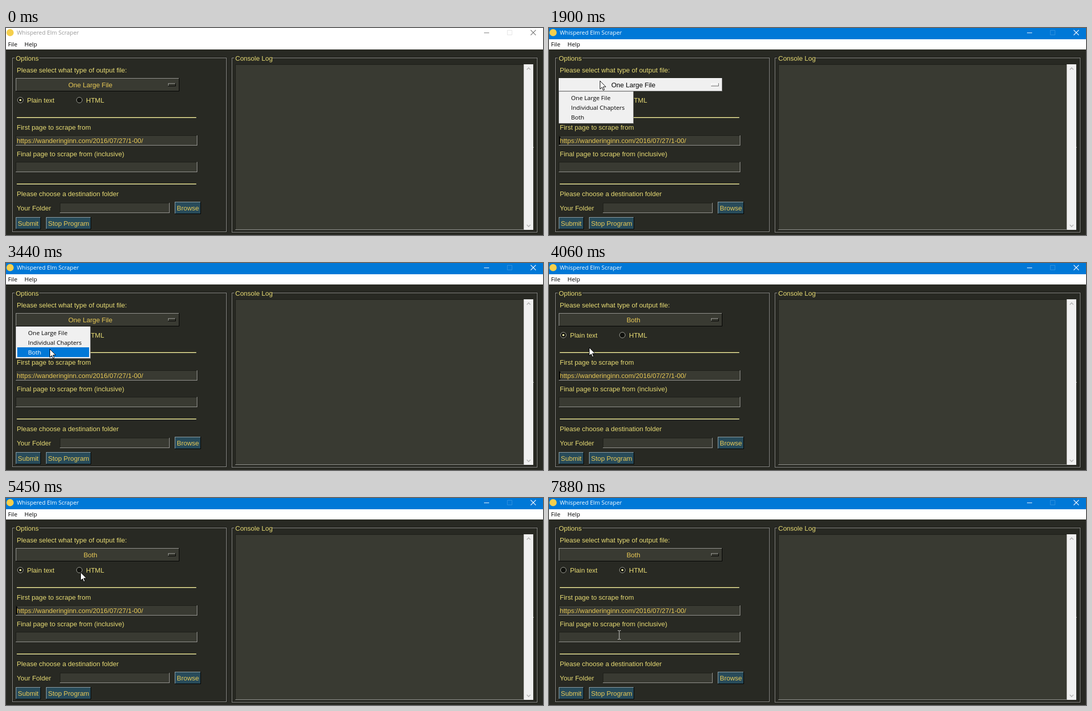
Animation, 1047 px wide and 405 px high, one loop 8000 ms. Source, as an HTML page:

```html
<!DOCTYPE html>
<html lang="en">
<head>
<meta charset="utf-8">
<title>Scraper window</title>
<style>
html, body { margin: 0; width: 100%; height: 100%; overflow: hidden; background: #282923; }
svg { display: block; --bar: #fff; --caption: #999; --control: #777; --disabled: #e3e3e3; }
svg.active { --bar: #0078d7; --caption: #fff; --control: #fff; --disabled: #3393df; }
text { font: 13px "Liberation Sans", Arial, sans-serif; fill: #e7db74; white-space: pre; }
.ui { font: 11.4px "Open Sans", "Noto Sans", sans-serif; fill: #000; }
.caption { font-size: 11.2px; fill: var(--caption); }
.item { font-size: 11.6px; }
.amber { fill: #e7c855; }
.black { fill: #000; }
rect, .edge { shape-rendering: crispEdges; }
</style>
</head>
<body>
<svg id="stage" width="1047" height="405"></svg>
<script>
const LOOP = 8000;
const MENU_OPEN = 1820, MENU_CLOSE = 3970;
const ACTIVATE = 1730, PRESS = 5910, RELEASE = 6000;
const ITEMS = ['One Large File', 'Individual Chapters', 'Both'];

// Pointer path: time, x, y
const PATH = [
  [120, 927, 398], [890, 349, 143], [1270, 146, 101], [1730, 99, 101], [1900, 99, 103],
  [2210, 99, 103], [2670, 92, 131], [2830, 92, 131], [3050, 90, 155], [3210, 90, 155],
  [3440, 85, 168], [3750, 85, 166], [3820, 75, 166], [3900, 75, 166], [4210, 80, 164],
  [4370, 80, 164], [4840, 107, 158], [5220, 140, 149], [5450, 145, 145],
  [6610, 145, 145], [6690, 146, 154], [7240, 147, 217], [7570, 147, 217], [7880, 137, 268]
];

const rect = (x, y, w, h, fill, extra = '') =>
  `<rect x="${x}" y="${y}" width="${w}" height="${h}" fill="${fill}" ${extra}/>`;
const text = (x, y, s, cls = '', extra = '') =>
  `<text x="${x}" y="${y}" class="${cls}" ${extra}>${s}</text>`;
const line = (d, stroke, extra = '') => `<path d="${d}" fill="none" stroke="${stroke}" ${extra}/>`;
const group = (id, body) => `<g id="${id}">${body}</g>`;

function bevel(x, y, w, h, fill, topLeft, bottomRight) {
  return rect(x, y, w, h, bottomRight) + rect(x, y, w - 1, h - 1, topLeft) +
    rect(x + 1, y + 1, w - 2, h - 2, fill);
}
const field = (x, y, w, h) => bevel(x, y, w, h, '#393a32', '#1c1d18', '#9c9c98');
const button = (x, y, w, label) =>
  bevel(x, y, w, 24, '#284b5a', '#93a5ac', '#000') + text(x + 4, y + 17, label, 'amber');
const outline = (x, y, w, h, color) =>
  line(`M${x + .5} ${y + .5}h${w - 1}v${h - 1}h${1 - w}z`, color, 'class="edge"');
const groove = (x, y, w, h, label, labelWidth) =>
  outline(x - 1, y - 1, w, h, '#181915') + outline(x, y, w, h, '#949491') +
  rect(x + 5, y - 5, labelWidth, 11, '#282923') + text(x + 7, y + 6, label);
const separator = y => rect(21, y, 350, 1, '#8b8346') + rect(21, y + 1, 350, 1, '#ffffb9');
const optionMenu = (fill, light, dark, cls) =>
  bevel(19, 98, 319, 26, fill, light, dark) + bevel(316, 108, 15, 6, fill, light, dark) +
  text(164.5, 116, ITEMS[0], cls + ' choice', 'text-anchor="middle"');
const radio = (x, dotId) =>
  `<circle cx="${x}" cy="141" r="5.5" fill="#11120e" stroke="#a5a59c"/>` +
  `<circle id="${dotId}" cx="${x}" cy="141" r="2.1" fill="#f0e9a8"/>`;

const titleBar =
  rect(0, 0, 1047, 22, 'var(--bar)') + rect(0, 22, 1047, 20, '#fff') +
  '<circle cx="8" cy="9" r="7" fill="#f5cf4c"/>' +
  text(21, 13, 'Whispered Elm Scraper', 'ui caption') +
  text(4, 36, 'File', 'ui') + text(36, 36, 'Help', 'ui') +
  line('M932 9.5h10', 'var(--control)') + line('M977.5 4.5h9v9h-9z', 'var(--disabled)') +
  line('M1023 4l10 10m0-10l-10 10', 'var(--control)', 'stroke-width="1.1"');

const options =
  groove(12, 58, 418, 341, 'Options', 48) +
  text(21, 87, 'Please select what type of output file:') +
  group('normal', optionMenu('#393a32', '#9c9c98', '#000', 'amber')) +
  group('hover', optionMenu('#f0f0f0', '#fff', '#696969', 'black')) +
  rect(136, 133, 54, 18, '#f0f0f0', 'id="flash"') +
  radio(28, 'plainDot') + text(41, 146, 'Plain text') +
  radio(143, 'htmlDot') + text(156, 146, 'HTML', '', 'id="htmlLabel"') +
  separator(174) + separator(304) +
  text(21, 199, 'First page to scrape from') + field(19, 210, 354, 20) +
  rect(20, 212, 2, 16, '#000', 'id="caret"') +
  text(21, 225, 'https://wanderinginn.com/2016/07/27/1-00/', 'amber') +
  text(21, 251, 'Final page to scrape from (inclusive)') + field(19, 262, 354, 20) +
  text(21, 329, 'Please choose a destination folder') +
  text(21, 357, 'Your Folder') + field(105, 342, 214, 20) +
  button(329, 340, 51, 'Browse') + button(19, 370, 49, 'Submit') + button(78, 370, 88, 'Stop Program');

const consoleLog =
  groove(440, 58, 596, 342, 'Console Log', 74) + field(447, 71, 563, 324) +
  rect(1010, 71, 18, 324, '#f0f0f0') +
  line('M1015.5 81.5l3.5-3.5 3.5 3.5M1015.5 385l3.5 3.5 3.5-3.5', '#b4b4b4', 'stroke-width="1.6"') +
  rect(1028, 233, 1, 1, '#ccc');

const menu = bevel(19, 124, 146, 63, '#f0f0f0', '#ccc', '#8a8a8a') +
  rect(22, 0, 140, 19, '#0078d7', 'id="highlight"') +
  ITEMS.map((s, i) => text(43, 141 + 19 * i, s, 'ui item')).join('');

const pointer =
  group('arrow', '<path d="M.5.5V16.5L4.2 13 6.6 18.8 9 17.8 6.6 12.1H11.8Z" fill="#fff" stroke="#000"/>') +
  group('beam', line('M-3-8.5h2.5M.5-8.5h2.5M-3 8.5h2.5M.5 8.5h2.5M0-8V8', '#dcdcd8'));

const stage = document.getElementById('stage');
stage.innerHTML = rect(0, 0, 1047, 405, '#282923') + titleBar + options + consoleLog +
  group('menu', menu) + group('pointer', pointer);

const el = id => document.getElementById(id);
const show = (id, on) => { el(id).style.display = on ? '' : 'none'; };
const within = (v, a, b) => v >= a && v < b;

function pointerAt(t) {
  const next = PATH.findIndex(p => p[0] > t);
  if (next <= 0) return PATH[next < 0 ? PATH.length - 1 : 0].slice(1);
  const [t0, x0, y0] = PATH[next - 1], [t1, x1, y1] = PATH[next];
  const k = (t - t0) / (t1 - t0);
  return [Math.round(x0 + (x1 - x0) * k), Math.round(y0 + (y1 - y0) * k)];
}

function render(t) {
  const [x, y] = pointerAt(t);
  const pressed = within(t, PRESS, RELEASE);
  const menuOpen = within(t, MENU_OPEN, MENU_CLOSE);
  const overButton = within(x, 19, 338) && within(y, 98, 124);
  const overEntry = within(x, 19, 373) && (within(y, 210, 230) || within(y, 262, 282));
  const picked = menuOpen && within(y, 127, 184) ? Math.floor((y - 127) / 19) : -1;

  stage.classList.toggle('active', t >= ACTIVATE);
  show('caret', t >= ACTIVATE && (t - ACTIVATE) % 900 < 600);
  show('normal', !overButton);
  show('hover', overButton);
  for (const label of document.querySelectorAll('.choice'))
    label.textContent = ITEMS[t < MENU_CLOSE ? 0 : 2];

  show('menu', menuOpen);
  show('highlight', picked >= 0);
  el('highlight').setAttribute('y', 127 + 19 * picked);
  document.querySelectorAll('.item').forEach((item, i) => {
    item.style.fill = i === picked ? '#fff' : '';
  });

  show('flash', pressed);
  el('htmlLabel').style.fill = pressed ? '#000' : '';
  show('plainDot', t < RELEASE);
  show('htmlDot', t >= RELEASE);

  show('pointer', t >= PATH[0][0]);
  show('arrow', !overEntry);
  show('beam', overEntry);
  el('pointer').setAttribute('transform', `translate(${x} ${y})`);
}

const start = performance.now();
function tick() {
  render((performance.now() - start) % LOOP);
  requestAnimationFrame(tick);
}
tick();
</script>
</body>
</html>
```
